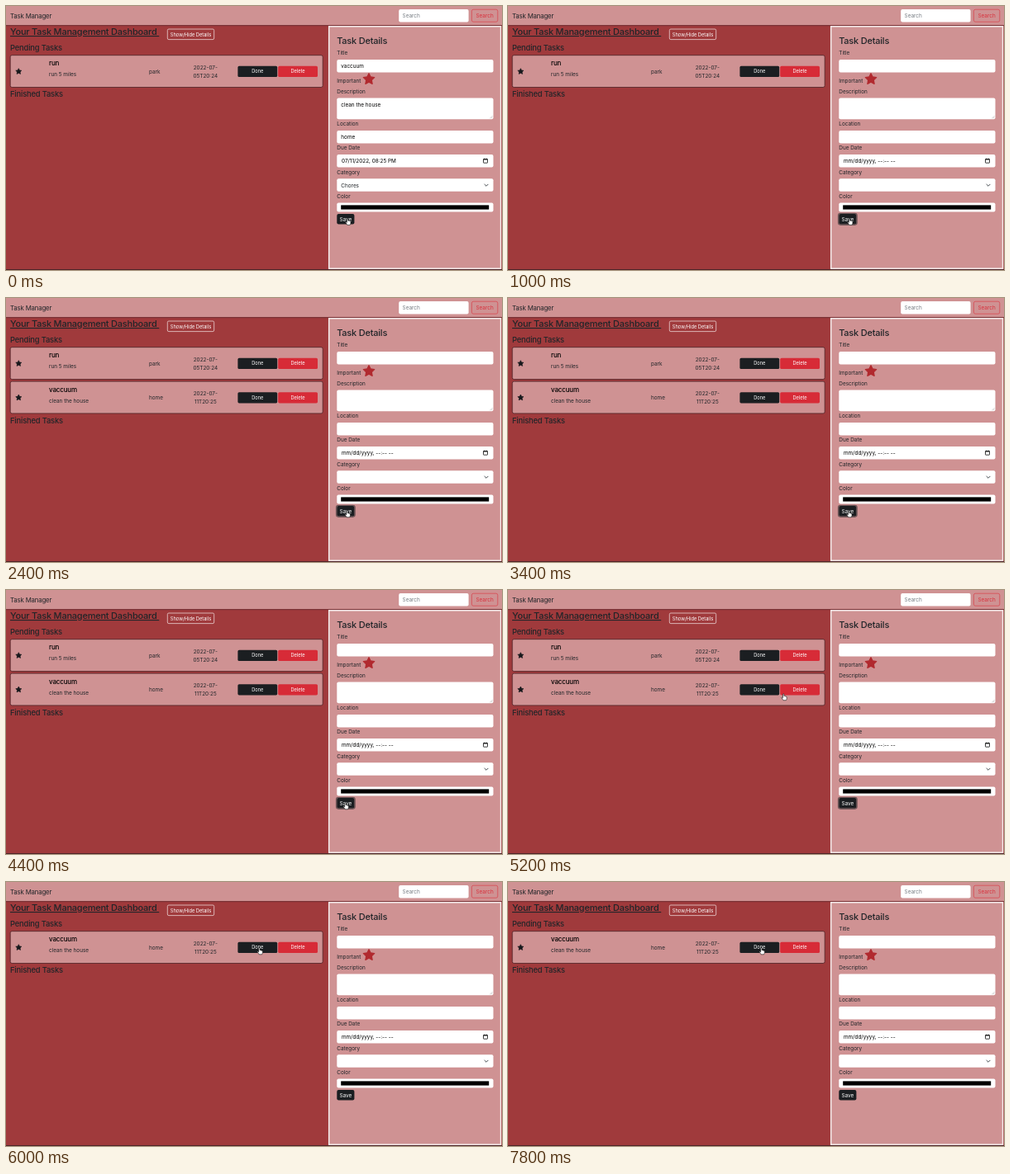
An HTML page that plays this animation: 600 px wide and 320 px high, repeating every 8 s.

```html
<!DOCTYPE html>
<html lang="en">
<head>
<meta charset="utf-8">
<title>Task Manager</title>
<style>
  html, body { margin: 0; width: 100%; height: 100%; overflow: hidden; background: #a03a3c; }
  svg { display: block; width: 100vw; height: 100vh; }
  text { font: 400 6.4px Inter, "Open Sans", sans-serif; fill: #212529; white-space: pre; }
  .brand { font-size: 7.8px; letter-spacing: -.02em; }
  .h1, .h2, .h3 { font-weight: 500; letter-spacing: -.02em; }
  .h1 { font-size: 11px; }
  .u { text-decoration: underline; }
  .h2 { font-size: 9.4px; }
  .h3 { font-size: 8px; fill: #000; }
  .black { fill: #000; }
  .small { font-size: 5.7px; }
  .light { fill: #fff; }
  .red { fill: #d9303c; }
  .hint { fill: #757b81; }
  .mid { text-anchor: middle; }
</style>
</head>
<body>
<svg id="stage" viewBox="0 0 600 320"></svg>
<script>
const LOOP = 8000, CLEARED = 600, ADDED = 1200, DONE = 6000, ROW = 41.4;
const DARK = '#1b1e21', PINK = '#cf9293', RED = '#d72b37';

const text = (x, y, s, cls = '') => `<text x="${x}" y="${y}" class="${cls}">${s}</text>`;
const rect = (x, y, w, h, fill, r = 0, extra = '') =>
  `<rect x="${x}" y="${y}" width="${w}" height="${h}" rx="${r}" fill="${fill}" ${extra}/>`;
const path = (d, extra) => `<path d="${d}" ${extra}/>`;
const group = (id, body) => `<g id="${id}">${body}</g>`;
const field = (y, h) => rect(400.3, y, 189.2, h, '#fff', 2);

function star(cx, cy, r, fill) {
  const pts = Array.from({ length: 10 }, (_, i) => {
    const a = (i / 5 - .5) * Math.PI, k = i % 2 ? r * .5 : r;
    return (cx + k * Math.cos(a)).toFixed(2) + ',' + (cy + k * Math.sin(a)).toFixed(2);
  });
  return `<polygon points="${pts.join(' ')}" fill="${fill}" stroke="${fill}" stroke-width="${r * .18}" stroke-linejoin="round"/>`;
}

function row(id, title, note, place, day, time) {
  return group(id,
    rect(5.2, 59.7, 378, 38.8, PINK, 2, 'stroke="#4c2226" stroke-width=".8"') +
    star(15.3, 79.4, 3.7, '#16181b') +
    text(52, 72.4, title, 'h3') + text(52, 85.3, note) +
    text(173, 81.6, place) +
    text(241.3, 76.8, day, 'mid') + text(241.3, 86.8, time, 'mid') +
    rect(280.4, 72.8, 47.8, 13.2, DARK, 1.6) + text(304.3, 81.4, 'Done', 'small light mid') +
    rect(329.2, 72.8, 47.8, 13.2, RED, 1.6) + text(353, 81.4, 'Delete', 'small light mid'));
}

const navbar =
  rect(0, 0, 600, 23.4, PINK) + rect(0, 23.2, 600, 1, '#6d2a2d') +
  text(5, 14.7, 'Task Manager', 'brand') +
  rect(475.2, 4, 84.4, 15.4, '#fff', 2) + text(479.6, 14.1, 'Search', 'hint') +
  rect(563.4, 4.2, 31.4, 15, 'none', 2, 'stroke="#d9404a" stroke-width=".7"') +
  text(579.1, 14.1, 'Search', 'red mid');

const board =
  text(5, 35, 'Your Task Management Dashboard\u00a0', 'h1 u') +
  rect(195.3, 28, 56.4, 12.6, 'none', 1.6, 'stroke="#f5e6e6" stroke-width=".7"') +
  text(223.5, 36.5, 'Show/Hide Details', 'small light mid') +
  text(5, 53.6, 'Pending Tasks', 'h2') +
  group('finished', text(5, 110.4, 'Finished Tasks', 'h2')) +
  row('run', 'run', 'run 5 miles', 'park', '2022-07-', '05T20:24') +
  row('vac', 'vaccuum', 'clean the house', 'home', '2022-07-', '11T20:25');

const labels = [['Title', 59.3], ['Important', 92.5], ['Description', 105.9], ['Location', 145.2],
  ['Due Date', 174.3], ['Category', 203.5], ['Color', 232.6]];

const form =
  rect(390.7, 24.8, 207.8, 293.4, PINK, 0, 'stroke="#f6eeee" stroke-width="1.5"') +
  text(400.2, 45.5, 'Task Details', 'h1') +
  labels.map(([s, y]) => text(400.3, y, s)).join('') +
  star(439, 88.7, 7, '#b12a2f') +
  field(65, 15.6) + field(111.6, 25.6) + field(150.9, 15.6) +
  field(180, 15.6) + field(209.2, 15.6) + field(238.4, 11.2) +
  path('M585.4 136.2l3-3M587 136.2l1.4-1.4', 'stroke="#888" stroke-width=".4"') +
  rect(577.5, 185.6, 5, 4.6, 'none', .4, 'stroke="#111" stroke-width=".8"') +
  path('M577.3 186h5.4M578.7 184.7v1M581.3 184.7v1', 'stroke="#111" stroke-width=".9"') +
  path('M578.9 216.2l2.1 2.1 2.1-2.1', 'fill="none" stroke="#343a40" stroke-width=".9" stroke-linecap="round"') +
  rect(405.2, 241.4, 179, 5.2, '#000') +
  group('filled',
    text(405.3, 75.2, 'vaccuum', 'black') + text(405.3, 122, 'clean the house', 'black') +
    text(405.3, 161.1, 'home', 'black') + text(406, 190.2, '07/11/2022, 08:25 PM', 'black') +
    text(405.3, 219.5, 'Chores')) +
  group('empty', text(406, 190.2, 'mm/dd/yyyy, --:-- --', 'black')) +
  group('focus', rect(399.6, 251.4, 22.5, 13.8, 'none', 2.6, 'stroke="#6d5557" stroke-width="1.4"')) +
  rect(400.3, 252, 21.1, 12.5, DARK, 2) + text(410.9, 260.5, 'Save', 'light mid');

// Pointing hand, fingertip at the origin
const hand = group('hand', path(
  'M-.7 .3Q0-.5 .7 .3V2.7Q1.4 2.1 1.9 2.9Q2.7 2.5 3 3.3Q4 3 4 4.2V5.5Q3.9 6.6 3.2 7.8H-.3Q-1 6.3-2.4 4.7Q-2.3 3.8-1.4 4.3L-.7 4.9Z',
  'fill="#fff" stroke="#111" stroke-width=".6" stroke-linejoin="round"'));

const stage = document.getElementById('stage');
stage.innerHTML = rect(0, 0, 600, 320, '#a03a3c') + navbar + board + form +
  rect(0, 319, 600, 1, '#4d2528') + hand;

const el = id => document.getElementById(id);
const show = (id, on) => el(id).style.display = on ? '' : 'none';
const move = (id, x, y) => el(id).setAttribute('transform', `translate(${x} ${y})`);

// time, x, y of the pointer
const trail = [[0, 413, 257.6], [1800, 413, 257.6], [2400, 412.4, 258], [3600, 412, 258],
  [4200, 410.4, 258], [4600, 410.4, 258], [5500, 306.4, 80], [LOOP, 306.4, 80]];

function pointer(t) {
  const i = trail.findIndex(p => p[0] > t);
  const [t0, x0, y0] = trail[i - 1], [t1, x1, y1] = trail[i];
  const u = (t - t0) / (t1 - t0), k = u * u * (3 - 2 * u);
  return [x0 + (x1 - x0) * k, y0 + (y1 - y0) * k];
}

function draw(t) {
  const [x, y] = pointer(t);
  const two = t >= ADDED && t < DONE;
  show('filled', t < CLEARED);
  show('empty', t >= CLEARED);
  show('focus', t >= CLEARED && t < 5500);
  show('run', t < DONE);
  show('vac', t >= ADDED);
  move('vac', 0, two ? ROW : 0);
  move('finished', 0, two ? ROW : 0);
  move('hand', x, y);
}

const start = performance.now();
function tick() {
  draw((performance.now() - start) % LOOP);
  requestAnimationFrame(tick);
}
tick();
</script>
</body>
</html>
```
